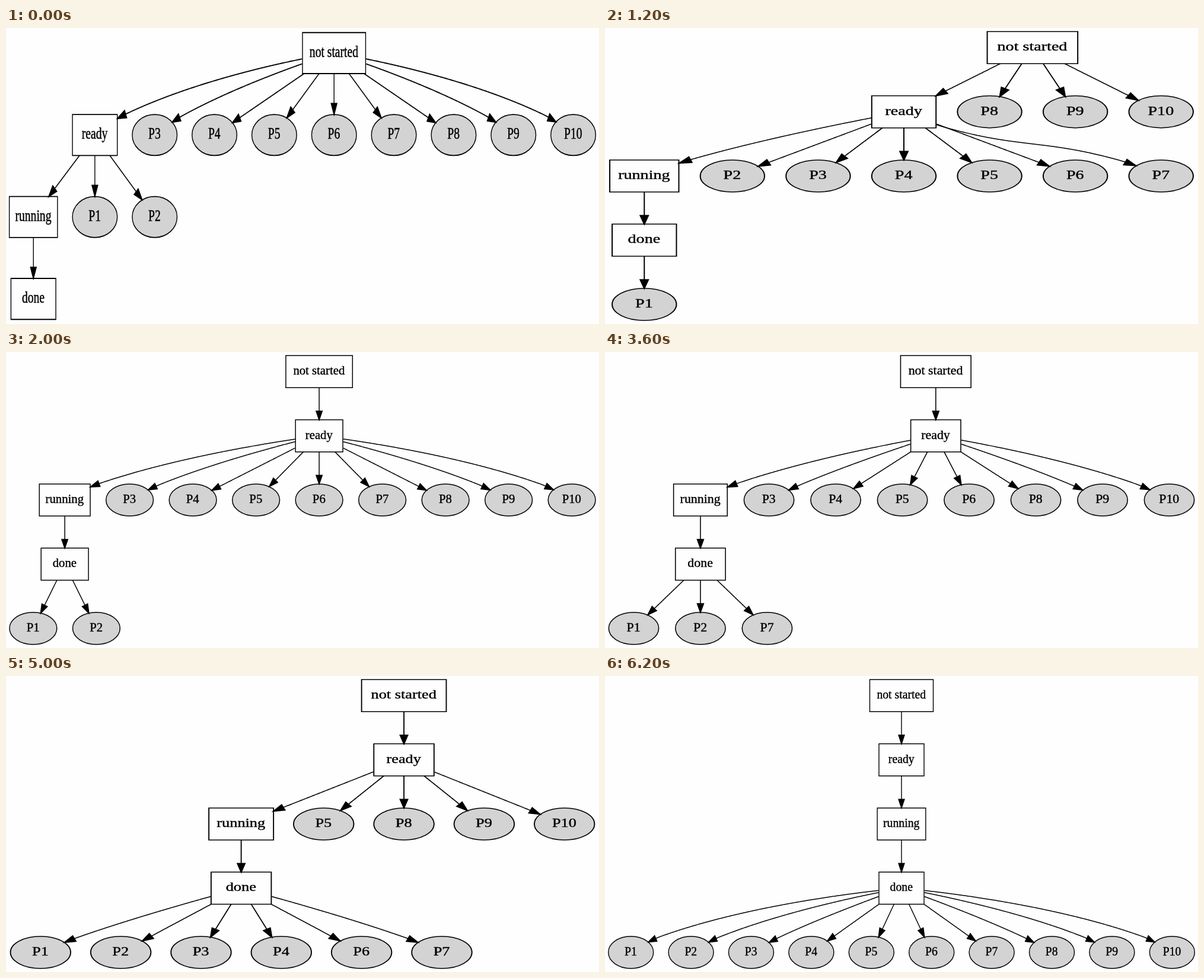
Animation, 1000 px wide and 500 px high, one loop 6400 ms. Source, as an HTML page with a canvas:

```html
<!DOCTYPE html>
<html lang="en">
<head>
<meta charset="utf-8">
<title>Process states</title>
<style>
html, body { margin: 0; width: 100%; height: 100%; overflow: hidden; background: #fefefe; }
canvas { display: block; width: 100vw; height: 100vh; }
</style>
</head>
<body>
<canvas id="stage" width="1000" height="500"></canvas>
<script>
const ctx = document.getElementById('stage').getContext('2d');
const LOOP = 6400, COUNT = 10;
const PAPER = '#fefefe', INK = '#000', GREY = '#d3d3d3';

// [time, processes admitted so far, process finished at this moment]
const STEPS = [
  [0, 2], [400, 4], [1000, 7], [1200, 7, 1], [1400, 7, 2], [1600, 8],
  [1800, 9], [2000, 10], [3600, 10, 7], [3800, 10, 3], [4000, 10, 4],
  [5000, 10, 6], [5400, 10, 5], [5600, 10, 9], [6000, 10, 8], [6200, 10, 10]
];

// Layout in points
const COL = 72, ROW = 72, HALF_H = 18, GAP = 18, PAD = 4;

function median(nodes) {
  const m = nodes.length - 1;
  return (nodes[Math.floor(m / 2)].x + nodes[Math.ceil(m / 2)].x) / 2;
}

function buildTree(step) {
  const admitted = STEPS[step][1];
  const finished = new Set(STEPS.slice(0, step + 1).map(s => s[2]));
  const nodes = [], edges = [];

  const add = (label, row, x, half, box) => {
    const node = { label, row, x, y: row * ROW, half, box };
    nodes.push(node);
    return node;
  };
  const state = (label, row, x, half = 27) => add(label, row, x, half, true);
  const leaves = (ids, row, x) => ids.map((id, i) => add('P' + id, row, x + i * COL, 27, false));
  const link = (from, children, crowded) => children.forEach(to => edges.push({ from, to, crowded }));

  const ids = Array.from({ length: COUNT }, (_, i) => i + 1);
  const over = ids.filter(id => finished.has(id));
  const queued = ids.filter(id => id <= admitted && !finished.has(id));
  const waiting = ids.filter(id => id > admitted);

  const running = state('running', 2, 0, 29);
  const done = state('done', 3, 0);
  const overRow = leaves(over, 4, -(over.length - 1) * COL / 2);
  const queue = [running, ...leaves(queued, 2, 74)];
  const ready = state('ready', 1, median(queue));
  const top = [ready, ...leaves(waiting, 1, ready.x + COL)];
  const idle = state('not started', 0, median(top), 38);

  link(idle, top);
  link(ready, queue, waiting.length > 0);
  link(running, [done]);
  link(done, overRow);
  return { nodes, edges };
}

function unit(a, b) {
  const dx = b[0] - a[0], dy = b[1] - a[1], d = Math.hypot(dx, dy);
  return [dx / d, dy / d];
}

// Shortest way around the neighbouring nodes
function route({ from, to, crowded }) {
  const dx = to.x - from.x, side = Math.sign(dx), far = Math.abs(dx);
  const reach = to.half + GAP / 2, clear = 27 + GAP / 2;
  const pts = [[0, 0]];
  if (crowded && side > 0 && far > 4 * clear) pts.push([clear, HALF_H]);
  if (far > 4 * reach) pts.push([far - reach, ROW - HALF_H]);
  pts.push([far, ROW]);
  return pts.map(([x, y]) => [from.x + side * x, from.y + y]);
}

// Smooth the corners of the route with cubic curves, then sample them
function smooth(pts) {
  const last = pts.length - 1, path = [];
  const tangent = i => {
    if (i === 0 || i === last) return [0, 0];
    const a = unit(pts[i - 1], pts[i]), b = unit(pts[i], pts[i + 1]);
    return unit([0, 0], [a[0] + b[0], a[1] + b[1]]);
  };
  for (let i = 0; i < last; i++) {
    const a = pts[i], b = pts[i + 1], u = tangent(i), v = tangent(i + 1);
    const pull = Math.hypot(b[0] - a[0], b[1] - a[1]) * 4 / 9;
    for (let k = 0; k <= 300; k++) {
      const t = k / 300, s = 1 - t;
      path.push([0, 1].map(j =>
        s * s * s * a[j] + 3 * s * s * t * (a[j] + pull * u[j]) +
        3 * s * t * t * (b[j] - pull * v[j]) + t * t * t * b[j]));
    }
  }
  return path;
}

function inside(node, [x, y]) {
  const u = (x - node.x) / node.half, v = (y - node.y) / HALF_H;
  return node.box ? Math.abs(u) < 1 && Math.abs(v) < 1 : u * u + v * v < 1;
}

function drawEdge(edge) {
  const path = smooth(route(edge));
  const start = path.findIndex(p => !inside(edge.from, p));
  const end = path.findIndex((p, i) => i > start && inside(edge.to, p));
  const tip = path[end];
  let k = end;
  while (k > start && Math.hypot(path[k][0] - tip[0], path[k][1] - tip[1]) < 10) k--;
  const base = path[k], [ux, uy] = unit(base, tip);

  ctx.beginPath();
  path.slice(start, k + 1).forEach(p => ctx.lineTo(p[0], p[1]));
  ctx.stroke();

  ctx.fillStyle = INK;
  ctx.beginPath();
  ctx.moveTo(tip[0], tip[1]);
  ctx.lineTo(base[0] - 3.5 * uy, base[1] + 3.5 * ux);
  ctx.lineTo(base[0] + 3.5 * uy, base[1] - 3.5 * ux);
  ctx.closePath();
  ctx.fill();
  ctx.stroke();
}

function drawNode({ label, x, y, half, box }) {
  ctx.beginPath();
  if (box) ctx.rect(x - half, y - HALF_H, 2 * half, 2 * HALF_H);
  else ctx.ellipse(x, y, half, HALF_H, 0, 0, 2 * Math.PI);
  ctx.fillStyle = box ? PAPER : GREY;
  ctx.lineWidth = 1;
  ctx.fill();
  ctx.stroke();

  // A hair of outline gives the letters their weight
  ctx.fillStyle = INK;
  ctx.lineWidth = 0.25;
  ctx.fillText(label, x - 0.2, y + 3.3);
  ctx.strokeText(label, x - 0.2, y + 3.3);
  ctx.lineWidth = 1;
}

// The whole tree is always scaled to fill the stage
function draw(step) {
  const { nodes, edges } = buildTree(step);
  const left = Math.min(...nodes.map(n => n.x - n.half)) - PAD;
  const right = Math.max(...nodes.map(n => n.x + n.half)) + PAD;
  const bottom = Math.max(...nodes.map(n => n.y)) + HALF_H + PAD;
  const top = -HALF_H - PAD;
  const sx = 1000 / (right - left), sy = 500 / (bottom - top);

  ctx.setTransform(1, 0, 0, 1, 0, 0);
  ctx.fillStyle = PAPER;
  ctx.fillRect(0, 0, 1000, 500);
  ctx.setTransform(sx, 0, 0, sy, -left * sx, -top * sy);
  ctx.font = '14px "Liberation Serif", "Times New Roman", serif';
  ctx.textAlign = 'center';
  ctx.strokeStyle = INK;
  nodes.forEach(drawNode);
  edges.forEach(drawEdge);
}

let shown = -1;
function tick() {
  const time = performance.now() % LOOP;
  const step = STEPS.filter(s => s[0] <= time).length - 1;
  if (step !== shown) draw(shown = step);
  requestAnimationFrame(tick);
}
tick();
</script>
</body>
</html>
```
